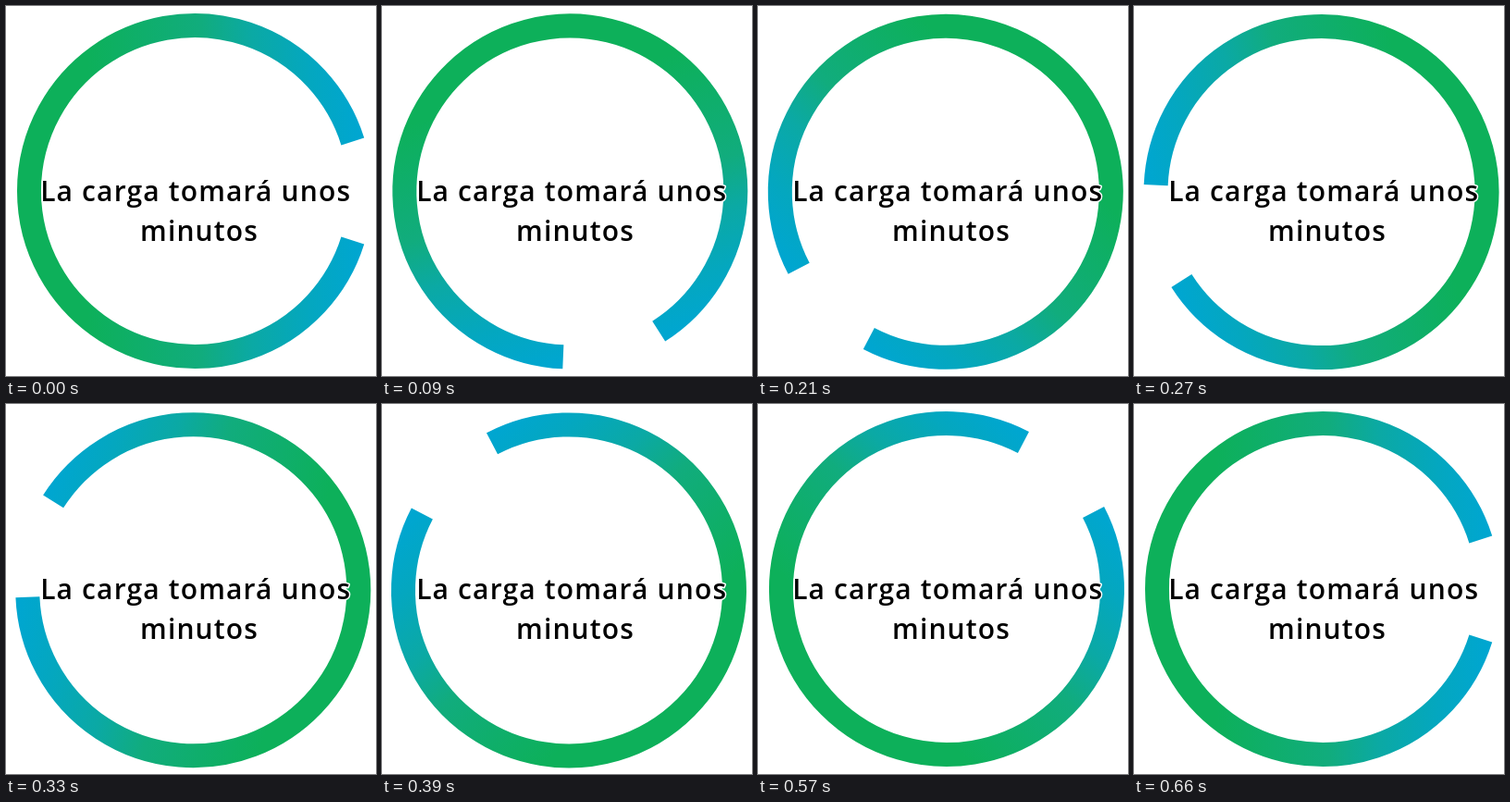
Recreate the animation shown at these times as an HTML page. Size 400 px wide and 400 px high, loop 690 ms.

```html
<!DOCTYPE html>
<html lang="es">
<head>
<meta charset="utf-8">
<title>Carga</title>
<style>
  html, body { margin: 0; width: 100%; height: 100%; overflow: hidden; background: #fff; }
  svg { display: block; width: 100%; height: 100%; }
  text { font: 600 30px "Open Sans", "Noto Sans", sans-serif; letter-spacing: 1.15px; text-anchor: middle; }
  .halo { fill: #fff; stroke: #fff; stroke-width: 3; stroke-linejoin: round; }
</style>
</head>
<body>
<svg viewBox="0 0 400 400">
  <defs>
    <linearGradient id="tint" gradientUnits="userSpaceOnUse" x1="-192" y1="0" x2="192" y2="0">
      <stop offset=".2" stop-color="#0db05a"/>
      <stop offset=".52" stop-color="#11ac7d"/>
      <stop offset=".66" stop-color="#0ba9a4"/>
      <stop offset=".82" stop-color="#04a7bf"/>
      <stop offset=".96" stop-color="#00a6d0"/>
    </linearGradient>
    <g id="label">
      <text x="205.2" y="211.3">La carga tomará unos</text>
      <text x="209" y="254">minutos</text>
    </g>
  </defs>
  <path id="ring" d="M170.8 53.5A179 179 0 1 1 170.8 -53.5" fill="none" stroke="url(#tint)" stroke-width="26"/>
  <use href="#label" class="halo"/>
  <use href="#label"/>
</svg>
<script>
  const STEP = 30, COUNT = 23, DRIFT_END = 18;
  const ring = document.getElementById('ring');

  function draw(now) {
    const k = Math.floor(now / STEP) % COUNT;
    const angle = k ? 30 + 15 * k : 0;
    // The centre slips with the turn, then snaps back.
    const slip = k > DRIFT_END ? 0 : angle;
    const x = 204 - slip / 110, y = 200 + slip / 155;
    ring.setAttribute('transform', `translate(${x} ${y}) rotate(${angle})`);
  }

  const start = performance.now();
  function tick() {
    draw(performance.now() - start);
    requestAnimationFrame(tick);
  }
  tick();
</script>
</body>
</html>
```
